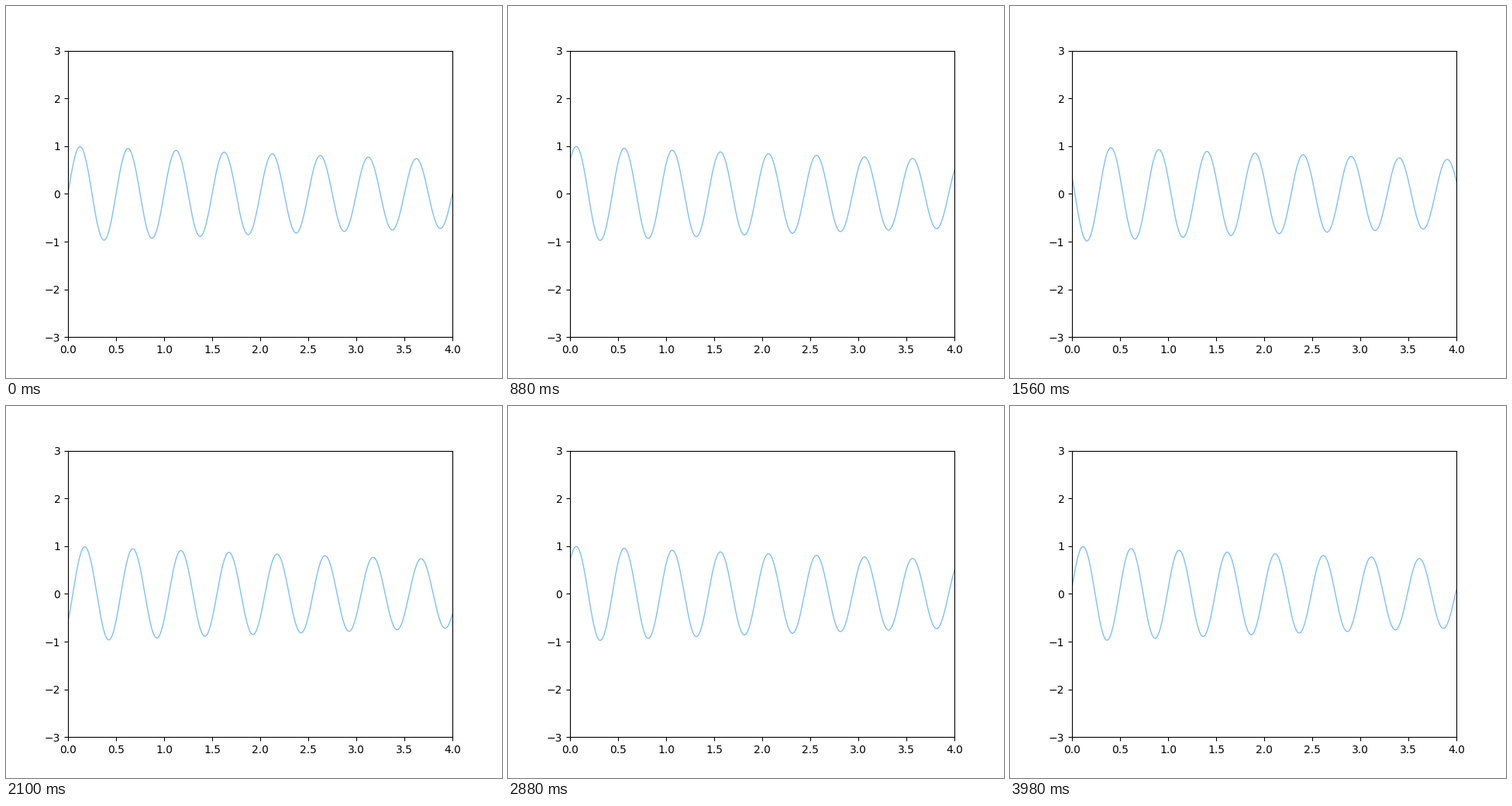
Recreate the animation shown at these times as a matplotlib script. Size 640 by 480 pixels, loop 4000 ms.

```python
import numpy as np
import matplotlib.pyplot as plt
from matplotlib.animation import FuncAnimation

FRAMES = 200
INTERVAL = 20       # ms
WAVELENGTH = 0.5
SHIFT = 0.01        # x units travelled per frame
DECAY = 12          # decay length of the envelope

fig, ax = plt.subplots(figsize=(6.4, 4.8), dpi=100)
ax.set(xlim=(0, 4), ylim=(-3, 3))

x = np.linspace(0, 4, 1000)
envelope = np.exp(-x / DECAY)
line, = ax.plot([], [], color="#7fbfff", lw=1)


def wave(i):
    return envelope * np.sin(2 * np.pi * (x - SHIFT * i) / WAVELENGTH)


def update(i):
    line.set_data(x, wave(i))
    return line,


anim = FuncAnimation(fig, update, frames=FRAMES, interval=INTERVAL,
                     repeat=True, repeat_delay=0, blit=False)
plt.show()
```
